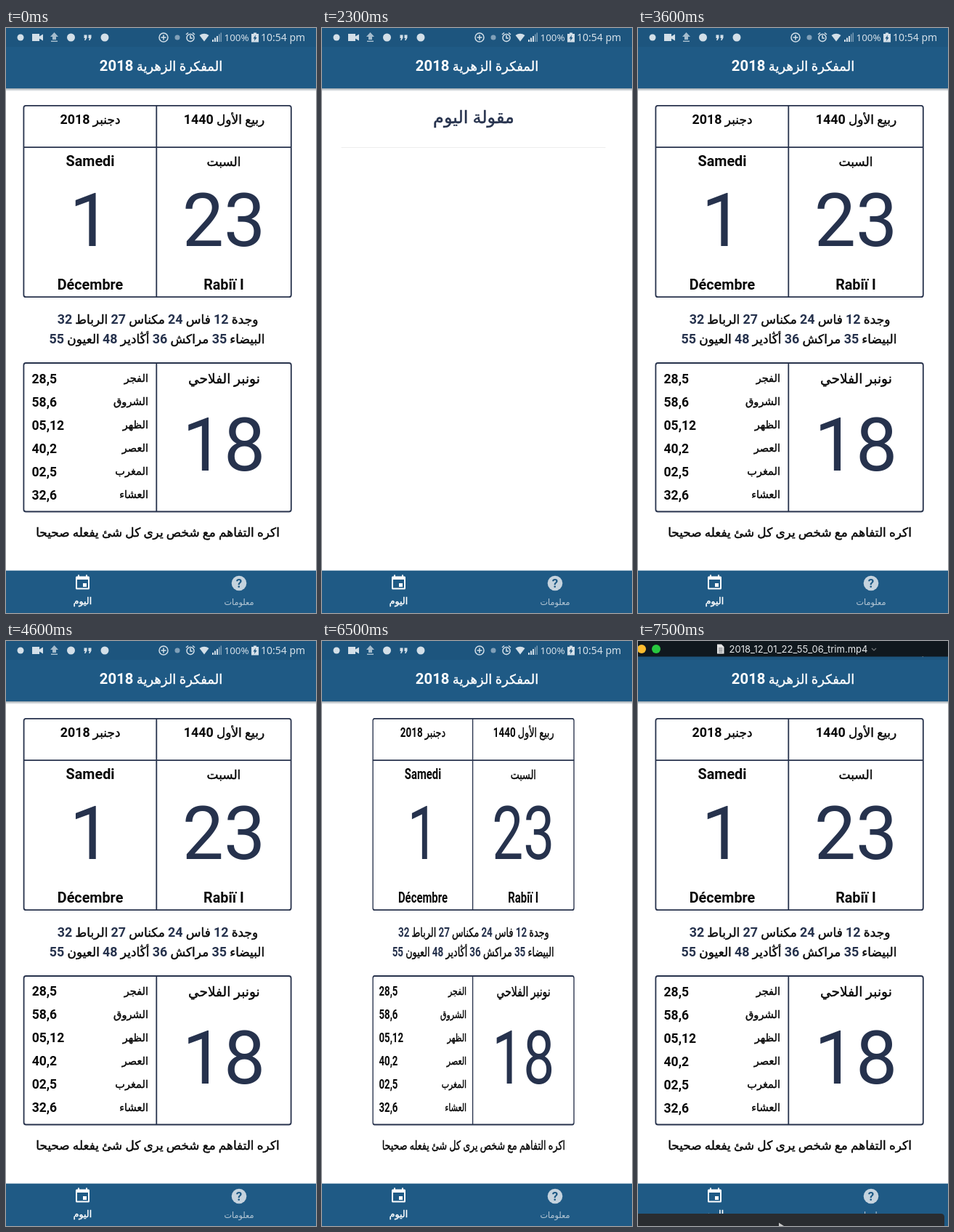
These frames come from a looping animation (427x805 px, 7700 ms). An HTML page:

```html
<!DOCTYPE html>
<html lang="ar">
<head>
<meta charset="utf-8">
<title>Calendar card flip</title>
<style>
  html, body { margin: 0; width: 100%; height: 100%; overflow: hidden; background: #fff; }
  svg { display: block; width: 427px; height: 805px; }
  text { font-family: Roboto, "DejaVu Sans", sans-serif; }
  .num { font-weight: 700; stroke: none; }
  .arabic { stroke-width: .45; }
  .status { font-family: "Noto Sans", sans-serif; }
  .mac { font-family: Inter, sans-serif; }
  .frame { fill: none; stroke: #27324c; stroke-width: 1.8; }
</style>
</head>
<body>
<svg viewBox="0 0 427 805" xmlns="http://www.w3.org/2000/svg">
  <rect width="427" height="805" fill="#fff"/>
  <g id="front">
    <g class="frame">
      <rect x="24.4" y="106.8" width="368.4" height="263.4" rx="3"/>
      <path d="M24 164.200H393M207.300 107V370M207.300 461V665"/>
      <rect x="24.4" y="461" width="368.4" height="204.500" rx="3"/>
    </g>
  </g>
  <g id="back">
    <path d="M26 164.5H391" stroke="#ededed"/>
  </g>

  <rect y="83" width="427" height="4" fill="url(#shade)"/>
  <rect width="427" height="83" fill="#1f5a85"/>
  <rect width="427" height="26" fill="#1d557e"/>
  <rect y="746.6" width="427" height="58.4" fill="#1f5a85"/>
  <defs>
    <linearGradient id="shade" x2="0" y2="1">
      <stop stop-color="#9aa5ad"/><stop offset="1" stop-color="#fff"/>
    </linearGradient>
  </defs>

  <g id="status" fill="#d3dfe8" stroke="none">
    <circle cx="20" cy="13" r="4.5"/>
    <path d="M36 8h10v3.500l5-3v9l-5-3V18H36z"/>
    <path d="M66.500 6l5.500 6h-3v4h-5v-4h-3zM62 17.500h9v1.500h-9z" opacity=".75"/>
    <circle cx="89.500" cy="13" r="5.500"/>
    <path d="M107.500 9.500h4v4l-2 3.500h-1.500l1-3h-1.500zM113.500 9.500h4v4l-2 3.500H114l1-3h-1.500z"/>
    <circle cx="136" cy="13" r="5.500"/>
    <circle cx="236" cy="13" r="3.500" opacity=".55"/>
    <g fill="none" stroke="#d3dfe8" stroke-width="1.500">
      <circle cx="217" cy="13" r="6"/><path d="M217 9.500v7M213.500 13h7"/>
      <circle cx="254" cy="13.500" r="5"/><path d="M254 10v4h3M248 9l3-2.500M260 9l-3-2.500"/>
    </g>
    <path d="M266.500 10q6.500-4.500 13 0L273 18.500z"/>
    <path d="M284 16h2v3h-2zM287 13.500h2V19h-2zM290 11h2v8h-2z"/>
    <path d="M293 8.500h1.500V19H293zM295.500 6.500h1.500V19h-1.500z" opacity=".5"/>
    <path d="M341 6.500h4v1.500h3v11.500h-10V8h3z"/>
    <path d="M344 9.500l-3.500 5h2l-.5 3.500 3.500-5h-2z" fill="#1d557e"/>
  </g>

  <g id="tabs">
    <path d="M99 752.500v2h-1.500q-1.500 0-1.500 1.500v15q0 1.500 1.500 1.500h16q1.500 0 1.500-1.500v-15q0-1.500-1.500-1.500H112v-2h-2v2h-9v-2zM98 759h15v11.500H98zM106 764h5v5h-5z" fill="#fff" fill-rule="evenodd"/>
    <circle cx="321" cy="764" r="10.300" fill="#c5d3de"/>
  </g>

  <g id="player">
    <rect width="427" height="21.500" fill="#10181e"/>
    <circle cx="5" cy="11" r="6" fill="#fcbc2f"/>
    <circle cx="25" cy="11" r="6" fill="#28c840"/>
    <path d="M109 4.500h6l3.500 3.500v9.500H109z" fill="#e5e5e5"/>
    <path d="M111 10h5.500M111 12.500h5.500M111 15h5.500" stroke="#62676b"/>
    <path d="M322 10l3 3 3-3" fill="none" stroke="#73777a" stroke-width="1.200"/>
    <path d="M0 788H417q5 0 5 5V805H0z" fill="#292c30"/>
    <path d="M194 800.500l7 4.500h-7z" fill="#c9c9c9"/>
  </g>
</svg>
<script>
const LOOP = 7700, FLIP = 777, CENTER = 208.5;
const NAVY = '#26324d', INK = '#080808';
const byId = id => document.getElementById(id);
const front = byId('front'), back = byId('back'), player = byId('player');

function addText(parent, content, x, y, size, { fill = INK, anchor = 'middle', cls = '', rtl = false } = {}) {
  const node = document.createElementNS('http://www.w3.org/2000/svg', 'text');
  const attrs = { x, y, 'font-size': size, fill, 'text-anchor': anchor, class: cls };
  if (rtl) Object.assign(attrs, { direction: 'rtl', stroke: fill });
  for (const key in attrs) node.setAttribute(key, attrs[key]);
  node.innerHTML = content;
  parent.append(node);
}

// Arabic text whose digits are set in bold at their own size.
function addArabic(parent, content, x, y, size, { digits = 17.9, digitFill = INK, ...rest } = {}) {
  const marked = content.replace(/\d+/g, n =>
    `<tspan class="num" font-size="${digits}" fill="${digitFill}">${n}</tspan>`);
  addText(parent, marked, x, y, size, { rtl: true, cls: 'arabic', ...rest });
}

function build() {
  addArabic(front, 'دجنبر 2018', 116, 132, 17);
  addArabic(front, 'ربيع الأول 1440', 300.5, 132, 17);
  addText(front, 'Samedi', 116, 190, 19.8, { cls: 'num' });
  addArabic(front, 'السبت', 300, 190, 17);
  addText(front, '1', 116, 300, 102, { fill: NAVY });
  addText(front, '23', 300, 300, 102, { fill: NAVY });
  addText(front, 'Décembre', 116, 360, 19.8, { cls: 'num' });
  addText(front, 'Rabiï I', 300, 360, 19.8, { cls: 'num' });

  const cities = { digitFill: NAVY };
  addArabic(front, 'وجدة 12 فاس 24 مكناس 27 الرباط 32', 209, 407, 17, cities);
  addArabic(front, 'البيضاء 35 مراكش 36 أڭادير 48 العيون 55', 208, 434, 17, cities);

  const prayers = [['الفجر', '28,5'], ['الشروق', '58,6'], ['الظهر', '05,12'],
                   ['العصر', '40,2'], ['المغرب', '02,5'], ['العشاء', '32,6']];
  prayers.forEach(([name, time], i) => {
    const y = 488.5 + i * 32;
    addText(front, time, 35.5, y, 17.6, { anchor: 'start', cls: 'num' });
    addArabic(front, name, 196, y - 1.5, 14.6, { anchor: 'start' });
  });
  addArabic(front, 'نونبر الفلاحي', 300.5, 489, 18.6);
  addText(front, '18', 300, 609, 102, { fill: NAVY });
  addArabic(front, 'اكره التفاهم مع شخص يرى كل شئ يفعله صحيحا', 209, 700, 16.9);

  addArabic(back, 'مقولة اليوم', 209, 131, 24, { fill: NAVY });

  const status = byId('status'), tabs = byId('tabs');
  const light = { fill: '#d3dfe8', anchor: 'start', cls: 'status' };
  addText(status, '100%', 300.5, 18, 13.4, light);
  addText(status, '10:54 pm', 351, 18, 14, light);
  addArabic(status, 'المفكرة الزهرية 2018', 213.5, 59, 18, { fill: '#fff', digits: 20.3, digitFill: '#fff' });
  addArabic(tabs, 'اليوم', 105.5, 793, 12.5, { fill: '#fff' });
  addArabic(tabs, 'معلومات', 321, 793.5, 11.3, { fill: '#b9cad7', cls: '', rtl: false });
  addText(tabs, '?', 321, 770, 17, { fill: '#1f5a85', cls: 'num' });
  addText(player, '2018_12_01_22_55_06_trim.mp4', 221, 15.5, 13, { fill: '#e6e8ea', cls: 'mac' });
}

const clamp = v => Math.max(0, Math.min(1, v));
const ease = (t, start) => (1 - Math.cos(Math.PI * clamp((t - start) / FLIP))) / 2;
const press = (t, start) => Math.sin(Math.PI * clamp((t - start) / 190)) * 0.025;

function setWidth(side, scale) {
  side.setAttribute('visibility', scale > 0.004 ? 'visible' : 'hidden');
  side.setAttribute('transform', `translate(${CENTER} 0) scale(${Math.max(scale, 0.004)} 1) translate(${-CENTER} 0)`);
}

function render(t) {
  const turn = ease(t, 742) - ease(t, 2227) + ease(t, 4542) - ease(t, 5971);
  const facing = Math.cos(Math.PI * turn);
  setWidth(front, facing * (1 + press(t, 560) + press(t, 4360)));
  setWidth(back, -facing);
  player.setAttribute('opacity', clamp((t - 7380) / 120));
}

function tick() {
  render(performance.now() % LOOP);
  requestAnimationFrame(tick);
}

build();
tick();
</script>
</body>
</html>
```
